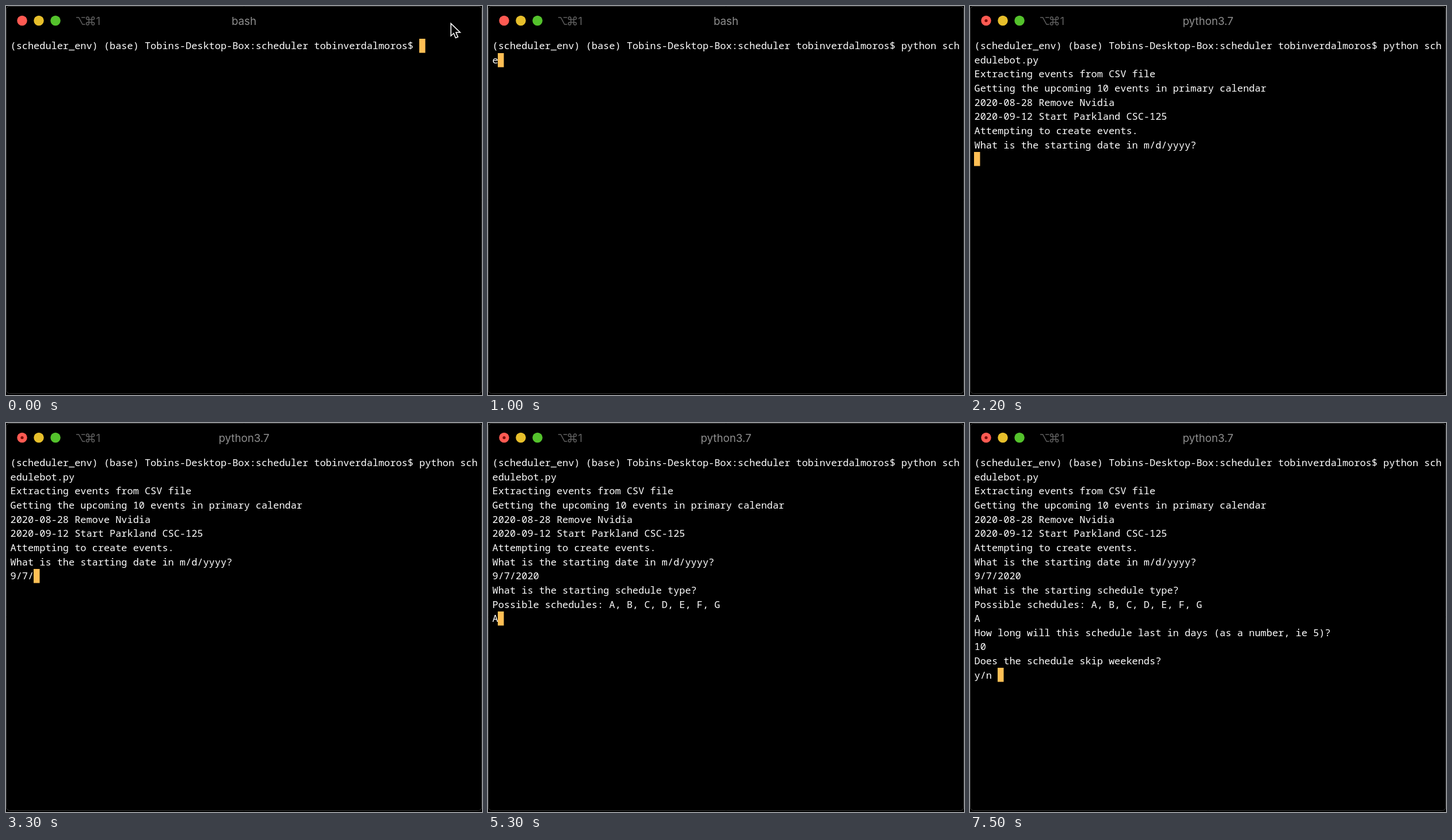
Recreate the animation shown at these times as an HTML page with a canvas. Size 827 by 677 pixels, loop 8 s.

```html
<!DOCTYPE html>
<html lang="en">
<head>
<meta charset="utf-8">
<title>Terminal</title>
<style>
html, body { margin: 0; width: 100%; height: 100%; overflow: hidden; background: #000; }
canvas { display: block; }
</style>
</head>
<body>
<canvas id="stage" width="827" height="677"></canvas>
<script>
const ctx = document.getElementById('stage').getContext('2d');
const LOOP = 8000, COLS = 80;
const CELL = { w: 10.15, h: 24.63, left: 7.5, top: 57 };
const RUNNING = 1700;
const PROMPT = '(scheduler_env) (base) Tobins-Desktop-Box:scheduler tobinverdalmoros$ ';

// Terminal output as [time, appended text]
const output = [[0, PROMPT]];
const type = (start, text, step = 100) =>
  [...text].forEach((ch, i) => output.push([start + i * step, ch]));
const print = (time, text) => output.push([time, text]);

type(100, 'python sc');
print(1000, 'he');
type(1100, 'dule');
print(1500, 'bot.py ');
print(1600, '\n');
print(1700, 'Extracting events from CSV file\n');
print(1800, 'Getting the upcoming 10 events in primary calendar\n');
print(1900, '2020-08-28 Remove Nvidia\n');
print(2000, '2020-09-12 Start Parkland CSC-125\n');
print(2100, 'Attempting to create events.\n');
print(2200, 'What is the starting date in m/d/yyyy?\n');
type(2900, '9/7/');
type(3500, '2020');
print(3900, '\nWhat is the starting schedule type?\nPossible schedules: A, B, C, D, E, F, G\n');
print(5300, 'A');
print(5800, '\nHow long will this schedule last in days (as a number, ie 5)?\n');
type(6800, '10');
print(7200, '\n');
print(7300, 'Does the schedule skip weekends?\ny/n ');

function disc(x, y, r, color) {
  ctx.fillStyle = color;
  ctx.beginPath();
  ctx.arc(x, y, r, 0, 2 * Math.PI);
  ctx.fill();
}

function drawShortcut() {
  ctx.strokeStyle = ctx.fillStyle = '#606060';
  ctx.lineWidth = 1.5;
  ctx.stroke(new Path2D('M122 20h4.5l6.5 12h4.5M131 20h6.5'));
  ctx.save();
  ctx.translate(146.5, 26);
  ctx.scale(0.95, 0.95);
  ctx.beginPath();
  for (let i = 0; i < 4; i++) {
    ctx.moveTo(-5, 2.6);
    ctx.arc(5, 5, 2.4, -Math.PI / 2, Math.PI);
    ctx.rotate(Math.PI / 2);
  }
  ctx.stroke();
  ctx.restore();
  ctx.textAlign = 'left';
  ctx.fillText('1', 156.5, 32.5);
}

function drawWindow(running) {
  ctx.fillStyle = '#000';
  ctx.fillRect(0, 0, 827, 677);
  ctx.strokeStyle = '#383838';
  ctx.lineWidth = 1;
  ctx.beginPath();
  ctx.roundRect(0.5, 0.5, 826, 674, 6);
  ctx.stroke();

  disc(28, 25.5, 8.7, '#ff5a52');
  disc(57, 25.5, 8.7, '#e7bf2b');
  disc(86, 25.5, 8.7, '#54c22c');
  if (running) disc(28, 25.5, 2.6, '#7a0c0a');

  ctx.font = '18.7px Inter, sans-serif';
  drawShortcut();
  ctx.fillStyle = '#8e8e8e';
  ctx.textAlign = 'center';
  ctx.fillText(running ? 'python3.7' : 'bash', 413.5, 32.5);
}

function drawText(text) {
  ctx.font = '16.92px "Noto Sans Mono", "DejaVu Sans Mono", monospace';
  ctx.textAlign = 'left';
  ctx.fillStyle = '#fff';
  let col = 0, row = 0;
  for (const ch of text) {
    if (ch === '\n') {
      col = 0;
      row++;
      continue;
    }
    ctx.fillText(ch, CELL.left + col * CELL.w, CELL.top + 18.2 + row * CELL.h);
    if (++col === COLS) {
      col = 0;
      row++;
    }
  }
  ctx.fillStyle = '#ffbf55';
  ctx.fillRect(Math.round(CELL.left - 0.4 + col * CELL.w),
    Math.round(CELL.top + row * CELL.h), 10.5, 24.5);
}

function drawPointer() {
  const arrow = new Path2D('M773 30.5V52l4.8-4.5 3.4 8 4-1.7-3.4-7.8H789Z');
  ctx.fillStyle = '#000';
  ctx.fill(arrow);
  ctx.strokeStyle = '#fff';
  ctx.lineWidth = 1.6;
  ctx.stroke(arrow);
}

function draw(now) {
  const t = now % LOOP;
  drawWindow(t >= RUNNING);
  drawText(output.filter(([time]) => time <= t).map(([, text]) => text).join(''));
  if (t < 100) drawPointer();
}

const start = performance.now();
function frame() {
  draw(performance.now() - start);
  requestAnimationFrame(frame);
}
frame();
</script>
</body>
</html>
```
